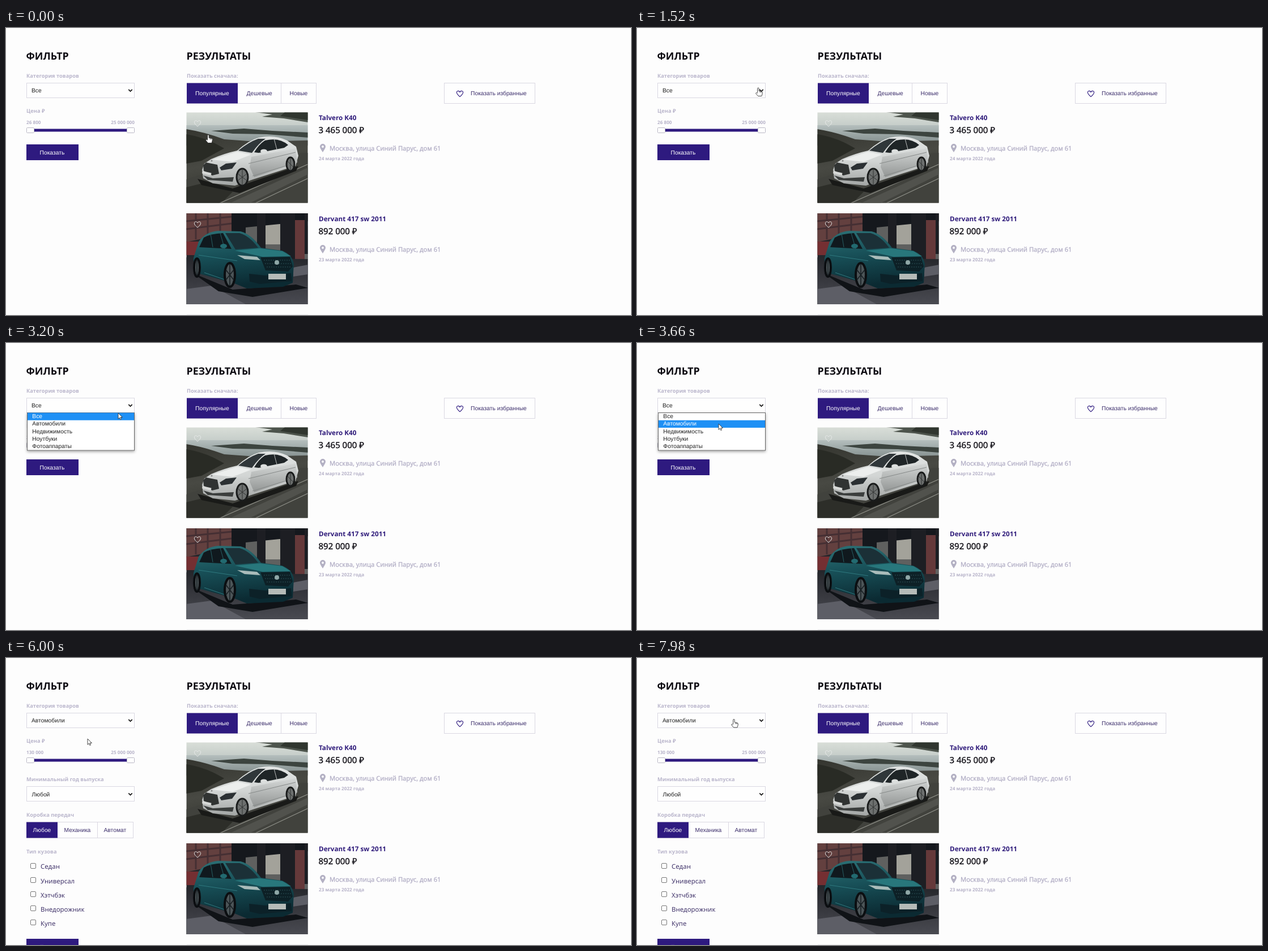
Write an HTML page that moves like this. It is 1103 px wide and 508 px high and loops after 8000 ms.

```html
<!DOCTYPE html>
<html lang="ru">
<head>
<meta charset="utf-8">
<title>Каталог</title>
<style>
html, body { margin: 0; width: 100%; height: 100%; overflow: hidden; background: #fdfdfd; }
svg { display: block; width: 100vw; height: 100vh; }
text { font: 10.3px "Liberation Sans", Arial, sans-serif; fill: #222; text-rendering: geometricPrecision; }
.title { font: 700 17.8px "Noto Sans", sans-serif; fill: #0b0910; }
.label { font: 700 9.3px "Noto Sans", sans-serif; fill: #bab6cc; }
.small { font: 700 8.2px "Noto Sans", sans-serif; fill: #b7b3c9; }
.name { font: 700 11.7px "Noto Sans", sans-serif; fill: #2e1a7a; }
.price { font: 500 15px "Noto Sans", sans-serif; fill: #0b0910; stroke: #0b0910; stroke-width: .3; }
.address { font: 500 11.2px "Noto Sans", sans-serif; fill: #b3afc6; stroke: #b3afc6; stroke-width: .3; }
.option { font: 400 11.4px "Noto Sans", sans-serif; fill: #41346a; }
.tab { fill: #3d2f6c; }
.on { fill: #fff; }
.end { text-anchor: end; }
.box { fill: #fefefe; stroke: #dad8e2; }
.accent { fill: #2e1a7f; }
.knob { fill: #fff; stroke: #b9b7c4; }
</style>
</head>
<body>
<svg viewBox="0 0 1103 508" preserveAspectRatio="none">
  <defs>
    <linearGradient id="sky" x2="0" y2="1"><stop stop-color="#d9ded8"/><stop offset="1" stop-color="#bcc5c2"/></linearGradient>
    <linearGradient id="sea" x2="0" y2="1"><stop stop-color="#b4bebd"/><stop offset="1" stop-color="#7d8888"/></linearGradient>
    <linearGradient id="land" x2=".3" y2="1"><stop stop-color="#34352f"/><stop offset=".5" stop-color="#484943"/><stop offset="1" stop-color="#31322c"/></linearGradient>
    <linearGradient id="silver" x2="0" y2="1"><stop stop-color="#e2e5e4"/><stop offset=".5" stop-color="#d2d5d4"/><stop offset="1" stop-color="#a2a5a4"/></linearGradient>
    <linearGradient id="flank" x2="0" y2="1"><stop stop-color="#d4d7d6"/><stop offset="1" stop-color="#929594"/></linearGradient>
    <linearGradient id="teal" x2=".2" y2="1"><stop stop-color="#2c7277"/><stop offset=".45" stop-color="#185058"/><stop offset="1" stop-color="#0b2a32"/></linearGradient>
    <linearGradient id="asphalt" x2="0" y2="1"><stop stop-color="#26272c"/><stop offset="1" stop-color="#494a51"/></linearGradient>
    <path id="heart" d="M0 5.2C-3 2.6-5.6.2-5.6-2.5-5.6-5.7-1.4-6 0-3 1.4-6 5.6-5.7 5.6-2.5 5.6.2 3 2.6 0 5.2Z"/>
    <path id="pin" d="M0 7.5C-3 2.5-5-.3-5-2.5a5 5 0 0 1 10 0C5-.3 3 2.5 0 7.5ZM0-4.4a1.9 1.9 0 1 0 .01 0Z" fill="#b3b0c3" fill-rule="evenodd"/>
    <path id="chevron" d="M-3.2-1.6 0 1.6 3.2-1.6" fill="none" stroke="#111" stroke-width="1.6"/>
    <clipPath id="frame"><rect x="318.5" y="149.5" width="214" height="160"/></clipPath>
    <clipPath id="frame2"><rect x="318.5" y="328" width="214" height="161"/></clipPath>
    <filter id="shadow" x="-10%" y="-20%" width="120%" height="140%"><feDropShadow dx="0" dy="2" stdDeviation="2.5" flood-opacity=".35"/></filter>
  </defs>
  <rect width="1103" height="508" fill="#fdfdfd"/>

  <!-- results -->
  <text class="title" x="318.5" y="56">РЕЗУЛЬТАТЫ</text>
  <text class="label" x="319" y="87.5">Показать сначала:</text>
  <rect class="box" x="319.5" y="97.5" width="228" height="36"/>
  <path d="M485.5 98V133" stroke="#dad8e2"/>
  <rect class="accent" x="319" y="97.5" width="90" height="36"/>
  <text class="on" x="334" y="119">Популярные</text>
  <text class="tab" x="424.5" y="119">Дешевые</text>
  <text class="tab" x="500.5" y="119">Новые</text>
  <rect class="box" x="773.5" y="97.5" width="160" height="36"/>
  <use href="#heart" x="801" y="116.5" fill="none" stroke="#2e1a7f" stroke-width="1.1"/>
  <text class="tab" x="820" y="119">Показать избранные</text>

  <!-- coast road -->
  <g clip-path="url(#frame)">
    <rect x="318" y="149" width="215" height="36" fill="url(#sky)"/>
    <path d="M533 149H440L470 153 452 157 490 160 533 167Z" fill="#4d544c"/>
    <path d="M533 149H492L484 156 533 163Z" fill="#30362f"/>
    <rect x="318" y="172" width="215" height="36" fill="url(#sea)"/>
    <path d="M362 182 420 178 470 182 533 185V194L460 188 400 187Z" fill="#3c443f"/>
    <path d="M318 179Q350 184 385 197L440 201 533 199V310H318Z" fill="url(#land)"/>
    <path d="M318 188Q352 193 385 213L345 235 318 240Z" fill="#292b25"/>
    <path d="M318 268 350 258 512 222 533 221V310H318Z" fill="#41423d"/>
    <path d="M318 282 350 274 400 290 380 310H318Z" fill="#2d2e29"/>
    <path d="M395 310 533 247V259L430 310Z" fill="#51524d"/>
    <path d="M377 310 533 241M440 310 533 266" stroke="#8f9089" stroke-width="1.2"/>
    <path d="M338 267 400 284 516 244 512 253 412 292 345 278Z" fill="#191a18"/>
    <path d="M346 251 350 240 362 232Q385 222 408 217 428 199 446 194 474 188 496 199L512 210 516 226 511 244 436 268 404 279 365 275 348 266Z" fill="url(#silver)"/>
    <path d="M433 228 511 213 514 238 438 264 430 246Z" fill="url(#flank)"/>
    <path d="M410 217Q428 202 445 196L458 196Q446 204 434 221Z" fill="#30373a"/>
    <path d="M438 220Q446 206 457 199 482 193 498 207L491 212 446 221Z" fill="#1f2527"/>
    <path d="M473 196 478 215" stroke="#b9bcbb"/>
    <ellipse cx="455" cy="218" rx="6" ry="3.5" fill="#dcdfde"/>
    <path d="M364 233 408 219 433 224 400 237Z" fill="#eceeed"/>
    <path d="M348 243 353 238 373 242 376 258 364 261 349 253Z" fill="#303332"/>
    <circle cx="363" cy="235" r="1.5" fill="#888"/>
    <path d="M377 247 388 240 407 238 399 249 380 252Z" fill="#2b3033"/>
    <path d="M348 261 365 266 402 264 400 272 356 269Z" fill="#3b3e3d"/>
    <rect x="347" y="253" width="16" height="4.5" fill="#d7d9d7" transform="rotate(14 347 253)"/>
    <path d="M428 240 511 220M435 262 494 244" stroke="#858988"/>
    <g fill="#6d706f" stroke="#191b1b" stroke-width="3"><ellipse cx="417" cy="264" rx="10" ry="15"/><ellipse cx="502" cy="241" rx="7" ry="12"/></g>
    <path d="M417 251V277M409 258 425 270M425 258 409 270M502 231V251M497 236 507 246" stroke="#303333"/>
  </g>

  <!-- city street -->
  <g clip-path="url(#frame2)">
    <rect x="318" y="328" width="215" height="161" fill="#25262b"/>
    <path d="M318 328H398V362L318 379Z" fill="#63403f"/>
    <path d="M318 342 398 334M318 356 398 346M335 328V374M356 328V370M378 328V365" stroke="#452f33" stroke-width="3"/>
    <rect x="318" y="378" width="26" height="24" fill="#742f32"/>
    <path d="M423 350H533V410H423Z" fill="#5f605f"/>
    <path d="M452 347H487V383H452Z" fill="#a3a29a"/>
    <path d="M398 328H533V342L423 353V375H398Z" fill="#15181d"/>
    <path d="M443 328H458V391H443ZM484 328H510V425H484ZM527 328H533V400H527Z" fill="#1d1e23"/>
    <path d="M510 340H527V411H510Z" fill="#65393a"/>
    <path d="M318 406 533 409V489H318Z" fill="url(#asphalt)"/>
    <path d="M318 462 363 456 423 489H318ZM507 424 533 419V436L507 440Z" fill="#5d5e66"/>
    <path d="M330 434 400 463 512 454 533 460 435 476 375 466Z" fill="#101317"/>
    <path d="M331 407 340 378Q352 361 374 359L414 360Q433 365 450 389L487 394Q505 401 508 417L506 451 489 458 425 461 403 452 331 432Z" fill="url(#teal)"/>
    <path d="M341 388 349 371Q361 364 383 363L398 391Z" fill="#10191e"/>
    <path d="M387 363H412Q430 368 445 389L405 392Z" fill="#1b3037"/>
    <path d="M361 364 365 388M378 363 386 391" stroke="#265e63"/>
    <path d="M404 394 448 390 488 395 503 404 453 405Z" fill="#28777c"/>
    <path d="M449 406 501 405 506 422 498 431 458 429Z" fill="#0d2026"/>
    <path d="M455 411H503M457 417H504M460 423H503" stroke="#2d5056" stroke-dasharray="2 2"/>
    <path d="M408 402 443 405 449 411 421 409Z" fill="#a9bcba"/>
    <path d="M429 435 457 438 503 434 504 448 448 453 430 449Z" fill="#0c2128"/>
    <circle cx="478" cy="415" r="4" fill="#8fa7a7"/>
    <rect x="463" y="435" width="31" height="10" fill="#b5bbb8"/>
    <path d="M340 402 408 412M350 433 385 445" stroke="#2f7a80"/>
    <ellipse cx="384" cy="386" rx="6" ry="4" fill="#226a70"/>
    <g fill="#4c5558" stroke="#0b0e11" stroke-width="4"><ellipse cx="395" cy="437" rx="9" ry="21"/><ellipse cx="337" cy="424" rx="5" ry="16"/></g>
    <path d="M395 418V456M388 428 402 446M402 428 388 446M337 410V438" stroke="#161e22" stroke-width="1.5"/>
  </g>
  <path d="M319 507.5H533" stroke="#ececef"/>
  <g id="cards"></g>

  <!-- filter -->
  <text class="title" x="35.5" y="56">ФИЛЬТР</text>
  <text class="label" x="36" y="87.5">Категория товаров</text>
  <rect class="box" x="36.5" y="97.5" width="190" height="26"/>
  <text id="category" x="45" y="114"></text>
  <use href="#chevron" x="219.5" y="110.5"/>
  <text class="label" x="36" y="150">Цена ₽</text>
  <text class="small" id="minPrice" x="36" y="169.5"></text>
  <text class="small end" x="227" y="169.5">25 000 000</text>
  <rect class="accent" x="42" y="178.5" width="178" height="5"/>
  <rect class="knob" x="36.5" y="176.5" width="13" height="9" rx="1"/>
  <rect class="knob" x="213.5" y="176.5" width="13" height="9" rx="1"/>
  <g id="carFilter">
    <text class="label" x="36" y="217.5">Минимальный год выпуска</text>
    <rect class="box" x="36.5" y="227.5" width="190" height="26"/>
    <text x="45.5" y="244.5">Любой</text>
    <use href="#chevron" x="219.5" y="241"/>
    <text class="label" x="36" y="280.5">Коробка передач</text>
    <rect class="box" x="36.5" y="290.5" width="188" height="28"/>
    <path d="M161.5 291V318" stroke="#dad8e2"/>
    <rect class="accent" x="36" y="290.5" width="55" height="28"/>
    <text class="on" x="47.5" y="308">Любое</text>
    <text class="tab" x="102.5" y="308">Механика</text>
    <text class="tab" x="172.5" y="308">Автомат</text>
    <text class="label" x="36" y="345.5">Тип кузова</text>
    <g id="bodies"></g>
  </g>
  <g id="submit">
    <rect class="accent" x="36" width="92" height="28"/>
    <text class="on" x="59.5" y="17.5">Показать</text>
  </g>
  <g id="popup">
    <rect x="37.5" y="123.5" width="189" height="66.5" fill="#fff" stroke="#666" filter="url(#shadow)"/>
    <rect id="highlight" x="38" width="188" height="13.2" fill="#1e90f5"/>
    <g id="options"></g>
  </g>

  <g id="cursor" stroke-linejoin="round" stroke-width=".9">
    <path id="hand" fill="#fff" stroke="#333" d="M-1.3 8.5V1.2a1.25 1.25 0 0 1 2.5 0V5.3l4.6 1q1.7.4 1.6 2.1L6.8 12 5.9 14.5H-.4L-3.9 10.4Q-4.8 9-3.6 8.5-2.6 8.2-1.3 9.7M3.1 6V8.3M5.2 6.4V8.5"/>
    <path id="arrow" fill="#fff" stroke="#333" d="M0 0V10.4L2.4 8.1 3.9 11.6 5.6 10.9 4.1 7.5H7.4Z"/>
  </g>
</svg>
<script>
const LOOP = 8000;
const OPEN = 2220, CLOSE = 5440, APPLY = 5460;
const CATEGORIES = ['Все', 'Автомобили', 'Недвижимость', 'Ноутбуки', 'Фотоаппараты'];
const ROW = 13.25, POPUP_TOP = 123;

// Pointer stops: time, x, y
const STOPS = [
  [20, 357, 189], [820, 251, 121], [860, 249, 119], [1240, 209, 104], [1520, 214, 106],
  [2920, 214, 106], [3200, 198, 124], [3320, 198, 124], [3660, 144, 143],
  [6000, 144, 143], [6720, 163, 128], [6820, 163, 128], [7140, 171, 108.5]
];

const $ = id => document.getElementById(id);
const show = (id, visible) => $(id).setAttribute('visibility', visible ? 'visible' : 'hidden');

const card = (y, name, price, date) => `
  <use href="#heart" x="338" y="${y + 19.5}" fill="none" stroke="#e9ebea"/>
  <text class="name" x="552" y="${y + 13}">${name}</text>
  <text class="price" x="551.5" y="${y + 36.5}">${price} ₽</text>
  <use href="#pin" x="559" y="${y + 63}"/>
  <text class="address" x="571" y="${y + 67.5}">Москва, улица Синий Парус, дом 61</text>
  <text class="small" x="552" y="${y + 84.5}">${date}</text>`;

$('cards').innerHTML =
  card(149.5, 'Talvero K40', '3 465 000', '24 марта 2022 года') +
  card(328.5, 'Dervant 417 sw 2011', '892 000', '23 марта 2022 года');

$('bodies').innerHTML = ['Седан', 'Универсал', 'Хэтчбэк', 'Внедорожник', 'Купе'].map((name, i) => `
  <rect x="43.5" y="${363.5 + i * 25}" width="9" height="9" rx="1.5" fill="#fff" stroke="#777"/>
  <text class="option" x="61" y="${373.3 + i * 25.2}">${name}</text>`).join('');

$('options').innerHTML = CATEGORIES.map((name, i) =>
  `<text x="46.3" y="${133 + i * ROW}">${name}</text>`).join('');

function pointerAt(time) {
  const next = STOPS.findIndex(stop => stop[0] > time);
  if (next === 0) return STOPS[0].slice(1);
  if (next < 0) return STOPS.at(-1).slice(1);
  const [t0, x0, y0] = STOPS[next - 1], [t1, x1, y1] = STOPS[next];
  const p = (time - t0) / (t1 - t0), ease = p * p * (3 - 2 * p);
  return [x0 + (x1 - x0) * ease, y0 + (y1 - y0) * ease];
}

function draw(time) {
  const [x, y] = pointerAt(time);
  const open = time >= OPEN && time < CLOSE;
  const cars = time >= APPLY;
  const overSelect = x < 227 && y >= 97 && y < POPUP_TOP;
  const overPhoto = x >= 319 && y >= 150;
  const active = open && y > POPUP_TOP + ROW ? 1 : 0;

  $('category').textContent = CATEGORIES[cars ? 1 : 0];
  $('minPrice').textContent = cars ? '130 000' : '26 800';
  show('carFilter', cars);
  $('submit').setAttribute('transform', `translate(0 ${cars ? 497 : 206})`);

  show('popup', open);
  $('highlight').setAttribute('y', POPUP_TOP + .5 + active * ROW);
  [...$('options').children].forEach((row, i) => row.classList.toggle('on', i === active));

  $('cursor').setAttribute('transform', `translate(${x} ${y})`);
  show('hand', overSelect || overPhoto);
  show('arrow', !(overSelect || overPhoto));
}

const start = performance.now();
function tick() {
  draw((performance.now() - start) % LOOP);
  requestAnimationFrame(tick);
}
tick();
</script>
</body>
</html>
```
